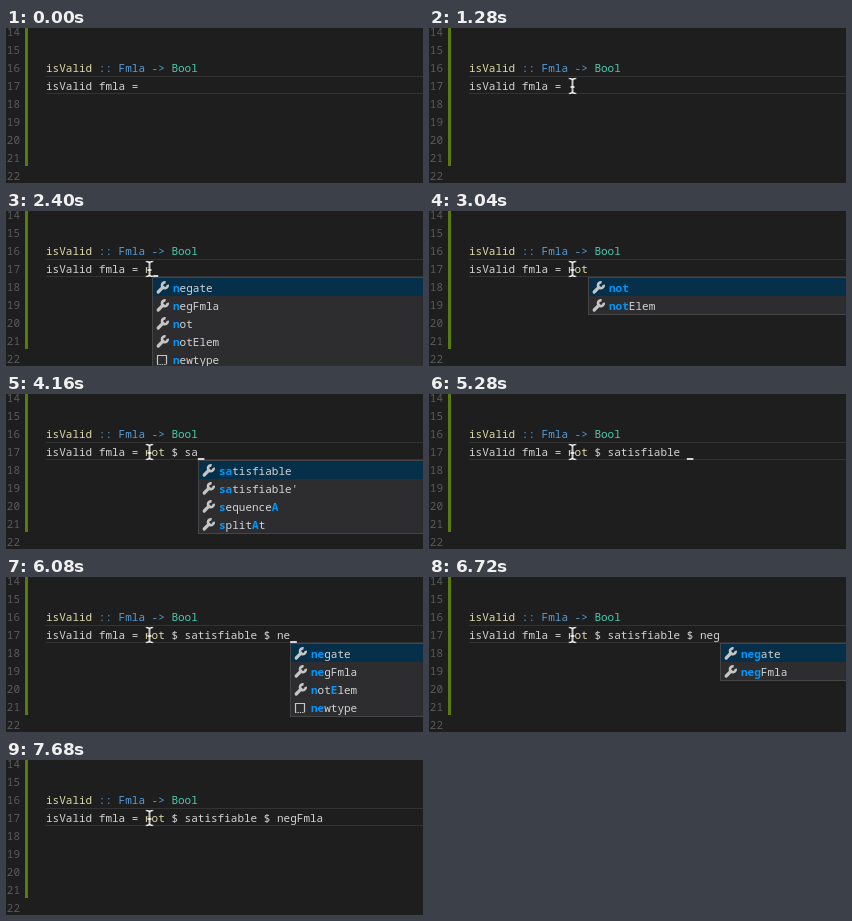
These frames come from a looping animation (417x155 px, 8 s). An HTML page:

```html
<!DOCTYPE html>
<html lang="en">
<head>
<meta charset="utf-8">
<title>Editor completion</title>
<style>
  html, body { margin: 0; width: 100%; height: 100%; overflow: hidden; background: #1e1e1e; }
  svg { display: block; width: 417px; height: 155px; }
  text { font: 11px "Noto Sans Mono", "DejaVu Sans Mono", monospace; fill: #d4d4d4; white-space: pre; }
  .num { fill: #5a5a5a; }
  .fn { fill: #dcdcaa; }
  .op { fill: #569cd6; }
  .type { fill: #4ec9b0; }
  .hit { fill: #0097fb; font-weight: bold; }
  #pointer { animation: reach 8s step-end infinite; }
  @keyframes reach {
    0% { transform: translate(125px, 128px); visibility: hidden; }
    2% { transform: translate(125px, 128px); visibility: visible; }
    4% { transform: translate(138px, 96px); }
    6% { transform: translate(149px, 70px); }
    8% { transform: translate(146px, 60px); }
    10%, 100% { transform: translate(143.5px, 58px); visibility: visible; }
  }
</style>
</head>
<body>
<svg viewBox="0 0 417 155">
  <defs>
    <g id="wrench" fill="none" stroke="#c5c5c5">
      <path d="M2.2 11 L7 6.2" stroke-width="3.2" stroke-linecap="round"/>
      <path d="M9.6 1.5 A2.9 2.9 0 1 0 11.7 3.7" stroke-width="2.6"/>
    </g>
    <g id="keyword" fill="none" stroke="#c5c5c5">
      <path d="M1.5 11 V2.5 H10.5 V11" stroke-width="1.2"/>
      <path d="M1 11.5 H11" stroke-width="1.2" stroke-dasharray="1.4 1"/>
    </g>
    <path id="beam" fill="none" d="M-3.5 -7.5 Q0 -7.5 0 -5.5 Q0 -7.5 3.5 -7.5 M0 -5.5 V5.5 M-3.5 7.5 Q0 7.5 0 5.5 Q0 7.5 3.5 7.5 M-2 1 H2"/>
  </defs>
  <rect width="417" height="155" fill="#1e1e1e"/>
  <path d="M40 48.5 H417 M40 65.5 H417" stroke="#333"/>
  <rect x="19" width="3" height="138" fill="#587c0c"/>
  <g id="numbers"></g>
  <text x="40" y="44"><tspan class="fn">isValid</tspan> <tspan class="op">:: Fmla -&gt;</tspan> <tspan class="type">Bool</tspan></text>
  <text x="40" y="62">isValid fmla =<tspan class="fn" id="head"></tspan><tspan id="tail"></tspan></text>
  <rect id="caret" y="64" width="6.6" height="2" fill="#d4d4d4"/>
  <g id="popup"></g>
  <g id="pointer">
    <use href="#beam" stroke="#111" stroke-width="3.2"/>
    <use href="#beam" stroke="#fff" stroke-width="1.5"/>
  </g>
</svg>
<script>
const LOOP = 8000, BLINK = 480, CHAR = 6.6, ROW = 18, TOP = 66;
const $ = id => document.getElementById(id);

const words = ["negate", "negFmla", "not", "notElem", "newtype",
  "satisfiable", "satisfiable'", "sequenceA", "splitAt"];

// time, text after "=", word being completed
const edits = [
  [800, ""],
  [2080, " "],
  [2400, " n", "n"],
  [2560, " not", "not"],
  [3520, " not "],
  [3680, " not $"],
  [3840, " not $ "],
  [4160, " not $ sa", "sa"],
  [4320, " not $ sat", "sat"],
  [4480, " not $ sati", "sati"],
  [4640, " not $ satis", "satis"],
  [4800, " not $ satisfiable"],
  [5280, " not $ satisfiable "],
  [5760, " not $ satisfiable $"],
  [5920, " not $ satisfiable $ "],
  [6080, " not $ satisfiable $ ne", "ne"],
  [6240, " not $ satisfiable $ neg", "neg"],
  [7200, " not $ satisfiable $ negFmla"]
];
const ARROW_DOWN = 7040;

// Marks the letters of query inside word, or returns null when it does not fit
function match(word, query) {
  if (word[0] !== query[0]) return null;
  let i = 0, html = "";
  for (const c of word) {
    const hit = i < query.length && c.toLowerCase() === query[i];
    if (hit) i++;
    html += hit ? `<tspan class="hit">${c}</tspan>` : c;
  }
  return i === query.length ? html : null;
}

function popup(x, query, selected) {
  const rows = words.map(word => [word, match(word, query)]).filter(row => row[1]);
  const list = rows.map(([word, html], i) => {
    const y = TOP + 1 + i * ROW;
    const bar = i === selected
      ? `<rect x="${x + 1}" y="${y}" width="428" height="${ROW}" fill="#062f4a"/>` : "";
    const icon = word === "newtype" ? "keyword" : "wrench";
    return `${bar}<use href="#${icon}" x="${x + 4}" y="${y + 3}"/>
      <text x="${x + 21}" y="${y + 14}">${html}</text>`;
  });
  return `<rect x="${x + .5}" y="${TOP + .5}" width="429" height="${rows.length * ROW + 1}"
    fill="#2d2d30" stroke="#454545"/>${list.join("")}`;
}

let shown;
function draw(t) {
  const [start, text, query] = edits.findLast(e => e[0] <= t) || [Infinity, ""];
  const x = 40 + (14 + text.length) * CHAR;
  const on = t >= start && (t - start) % (2 * BLINK) < BLINK;
  const selected = t >= ARROW_DOWN ? 1 : 0;
  const key = [text, on, selected].join("|");
  if (key === shown) return;
  shown = key;
  $("head").textContent = text.slice(0, 4);
  $("tail").textContent = text.slice(4);
  $("caret").setAttribute("x", x);
  $("caret").setAttribute("visibility", on ? "visible" : "hidden");
  $("popup").innerHTML = query ? popup(Math.round(x), query, selected) : "";
}

for (let n = 14; n <= 22; n++)
  $("numbers").innerHTML += `<text class="num" x="0.8" y="${62 + (n - 17) * ROW}">${n}</text>`;

const pointer = $("pointer").getAnimations()[0];
const begin = performance.now();
function tick() {
  const t = (performance.now() - begin) % LOOP;
  if (pointer) pointer.currentTime = t;
  draw(t);
  requestAnimationFrame(tick);
}
tick();
</script>
</body>
</html>
```
